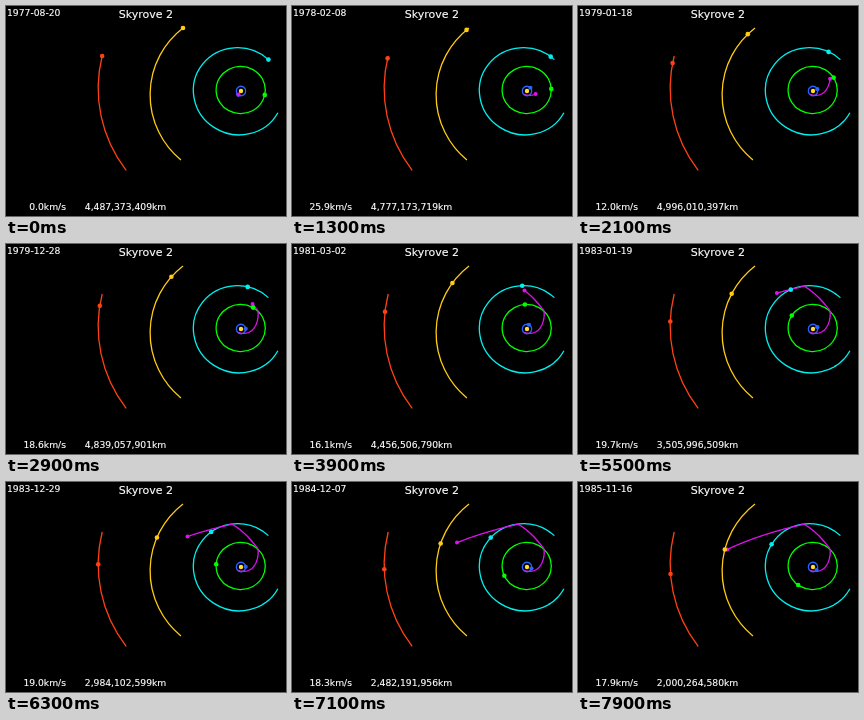
An HTML page for the animation above (8000 ms loop, 280 by 210 pixels).

```html
<!DOCTYPE html>
<html lang="en">
<head>
<meta charset="utf-8">
<title>Skyrove 2</title>
<style>
  html, body { margin: 0; width: 100%; height: 100%; overflow: hidden; background: #000; }
  svg { display: block; width: 100vw; height: 100vh; }
  path { fill: none; stroke-width: 1.3; }
  text { fill: #fff; stroke: #fff; stroke-width: 0.15; font: 9.2px "DejaVu Sans", sans-serif; }
  .title { font-size: 11px; text-anchor: middle; }
  .right { text-anchor: end; }
</style>
</head>
<body>
<svg viewBox="0 0 280 210">
  <g id="orbits"></g>
  <path id="trail" stroke="#e010f0"/>
  <g id="bodies"></g>
  <text id="date" x="1" y="9.8"></text>
  <text class="title" x="140" y="11.5">Skyrove 2</text>
  <text id="speed" class="right" x="60" y="204"></text>
  <text id="distance" class="right" x="160.3" y="204"></text>
</svg>
<script>
const LOOP = 8000, HOLD = 1000, STEP = 100, DAYS_PER_STEP = 43;
const START_DATE = Date.UTC(1977, 7, 20);
const SUN = [235, 85];
const SUN_PULL = 8425; // 2GM in km²/s² times pixels
const RAD = Math.PI / 180;
const $ = id => document.getElementById(id);

// One Bézier leg between flybys; points hold x, y and distance in million km.
// Energy is the squared speed left over far from the sun.
const launch = [232.5, 88.5, 4487.373409];
const firstFlyby = [251.7, 66.6, 5014.898];
const secondFlyby = [226.3, 42.2, 4326.306];
const legs = [
  { from: 0, to: 16, energy: -256, points: [launch, [251, 94, 4983.894], [253.5, 71, 5000], firstFlyby] },
  { from: 16, to: 34, energy: 40, points: [firstFlyby, [240.5, 51, 4604.588], secondFlyby] },
  { from: 34, to: 70, energy: 222.6, points: [secondFlyby, [183.8, 51.4, 3062.12], [149.3, 67.4, 2000.26458]] }
];

// Angles in degrees, counter-clockwise from the right; tilt turns the ellipse clockwise.
const planets = [
  { color: '#2b62ff', cx: 235, cy: 85, rx: 4.7, ry: 4.7, from: 0, to: 359.9, angle: k => 234 + 42.38 * k },
  { color: '#00ff00', cx: 234.7, cy: 84, rx: 24.6, ry: 23.6, from: 0, to: 359.9, angle: k => -12 + 3.511 * k + 1.7 * Math.sin(0.09 * k) },
  { color: '#00f0f0', cx: 232.3, cy: 85.3, rx: 45.1, ry: 43.4, tilt: 18, from: 47.3, to: 331.2, angle: k => 47.3 + 1.52 * k - 0.001 * k * k },
  { color: '#ffcc10', cx: 228.5, cy: 88.8, rx: 84.4, ry: 84.4, from: 127.6, to: 230.6, angle: k => 127.6 + 0.54 * k },
  { color: '#ff4014', cx: 226.2, cy: 82.4, rx: 134, ry: 134, from: 166, to: 217.7, angle: k => 166 + 0.259 * k }
];

function bezier(points, u) {
  if (points.length === 1) return points[0];
  const next = points.slice(1).map((q, i) => q.map((v, axis) => points[i][axis] + (v - points[i][axis]) * u));
  return bezier(next, u);
}

function flightAt(k) {
  const leg = legs.find(l => k <= l.to);
  const [x, y, distance] = bezier(leg.points, (k - leg.from) / (leg.to - leg.from));
  const sunDistance = Math.hypot(x - SUN[0], y - SUN[1]);
  const speed = k ? Math.sqrt(SUN_PULL / sunDistance + leg.energy) : 0;
  return { pos: [x, y], distance, speed };
}

function pointAt({ cx, cy, rx, ry, tilt = 0 }, degrees) {
  const a = (degrees + tilt) * RAD, turn = tilt * RAD;
  const x = rx * Math.cos(a), y = -ry * Math.sin(a);
  return [
    cx + x * Math.cos(turn) - y * Math.sin(turn),
    cy + x * Math.sin(turn) + y * Math.cos(turn)
  ];
}

function add(parent, tag, attrs) {
  const el = document.createElementNS('http://www.w3.org/2000/svg', tag);
  for (const name in attrs) el.setAttribute(name, attrs[name]);
  return parent.appendChild(el);
}

function place(dot, [x, y]) {
  dot.setAttribute('cx', x);
  dot.setAttribute('cy', y);
}

const addDot = (fill, r) => add($('bodies'), 'circle', { fill, r });

for (const p of planets) {
  const large = p.to - p.from > 180 ? 1 : 0;
  add($('orbits'), 'path', {
    d: `M${pointAt(p, p.from)}A${p.rx} ${p.ry} ${p.tilt || 0} ${large} 0 ${pointAt(p, p.to)}`,
    stroke: p.color
  });
}

const earth = planets[0];
earth.dot = addDot(earth.color, 2.1);
const craft = addDot('#e010f0', 2);
place(addDot('#ffe030', 2.2), SUN);
for (const p of planets.slice(1)) p.dot = addDot(p.color, 2.3);

function draw(k) {
  for (const p of planets) place(p.dot, pointAt(p, p.angle(k)));

  const flight = flightAt(k);
  place(craft, flight.pos);
  const track = Array.from({ length: 2 * k + 1 }, (_, i) => flightAt(i / 2).pos);
  $('trail').setAttribute('d', 'M' + track.join('L'));

  const date = new Date(START_DATE + k * DAYS_PER_STEP * 864e5);
  $('date').textContent = date.toISOString().slice(0, 10);
  $('speed').textContent = flight.speed.toFixed(1) + 'km/s';
  $('distance').textContent = Math.round(flight.distance * 1e6).toLocaleString('en-US') + 'km';
}

const start = performance.now();
let shown = -1;

function tick() {
  const t = (performance.now() - start) % LOOP;
  const k = Math.max(0, Math.floor((t - HOLD) / STEP) + 1);
  if (k !== shown) draw(shown = k);
  requestAnimationFrame(tick);
}
tick();
</script>
</body>
</html>
```
